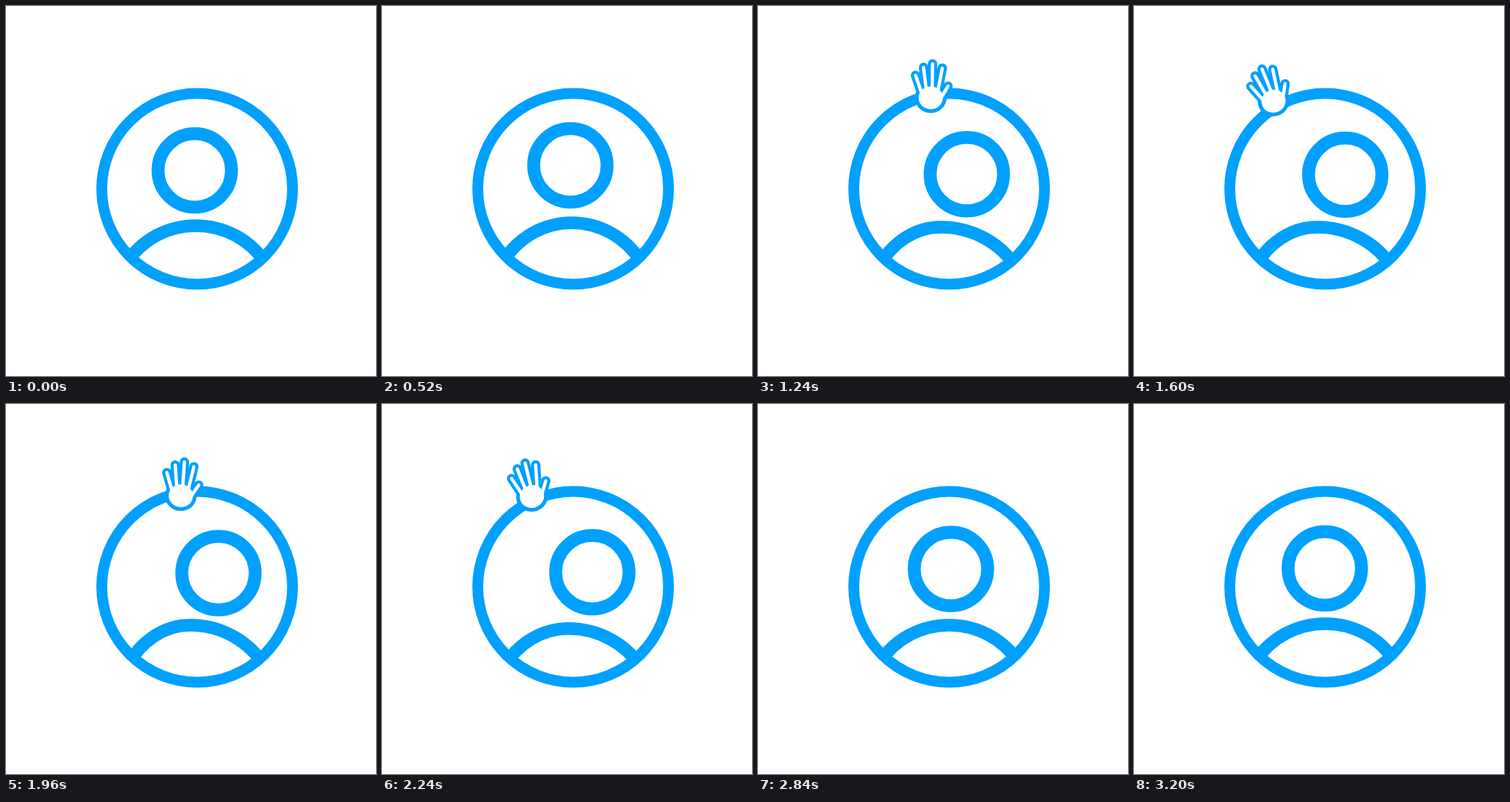
Recreate the animation shown at these times as an HTML page with a canvas. Size 512 by 512 pixels, loop 4080 ms.

```html
<!DOCTYPE html>
<html lang="en">
<head>
<meta charset="utf-8">
<title>Waving avatar</title>
<style>
  html, body { margin: 0; width: 100%; height: 100%; overflow: hidden; background: #fff; }
  canvas { display: block; width: 100vmin; height: 100vmin; }
</style>
</head>
<body>
<canvas id="stage" width="512" height="512"></canvas>
<script>
const ctx = document.getElementById('stage').getContext('2d');
const BLUE = '#00a0ff', WHITE = '#fff';
const LOOP = 4080, STEP = 40, REST = 3200;
const RING = { x: 264.5, y: 253, r: 132 };

// time, x, y
const head = [
  [0, 261.2, 227.5], [240, 250, 229], [520, 260.7, 220.5], [800, 283.5, 237],
  [1240, 289, 232.7], [1960, 294, 234], [2520, 284.5, 230.5],
  [2840, 267, 228.3], [3200, 264, 227.5]
];
// time, centre x, drop of the ends, apex x, apex y
const body = [
  [0, 263, 0, 262.5, 304], [240, 262, 3, 267, 305], [520, 263, -1, 262.5, 300],
  [800, 262.5, 7.5, 256, 310], [1240, 262, 7, 253, 306], [1960, 263, 8.5, 255, 306],
  [2520, 264, 11.5, 262, 315.5], [2840, 264.5, 2, 264.5, 306], [3200, 264.5, 0, 265, 304]
];
// time, palm x, palm y, degrees, scale
const hand = [
  [560, 150, 225, -75, 0], [640, 130, 180, -55, 1], [800, 185.5, 131, -26, 1],
  [1080, 243, 125, 2, 1], [1240, 239, 125, 0, 1], [1560, 190, 130, -24, 1],
  [1880, 245, 125.5, 4, 1], [1960, 242, 125, 3, 1], [2200, 205, 128, -16, 1],
  [2340, 215, 118, -9, 1], [2480, 190, 150, -25, 0]
];
// base x, base y, tip x, tip y, relative to the palm
const fingers = [
  [-13, -6, -21, -29], [-6, -8, -10, -40], [2, -8, 2.5, -45],
  [10, -8, 16, -39], [13, 4, 24, -14]
];

// Smooth interpolation that never overshoots its keys
function sample(keys, t) {
  const last = keys.length - 1;
  if (t <= keys[0][0]) return keys[0].slice(1);
  if (t >= keys[last][0]) return keys[last].slice(1);
  let i = 0;
  while (keys[i + 1][0] <= t) i++;
  const span = keys[i + 1][0] - keys[i][0], u = (t - keys[i][0]) / span;
  const rate = (n, c) => (keys[n + 1][c] - keys[n][c]) / (keys[n + 1][0] - keys[n][0]);
  const slope = (n, c) => {
    if (n === 0) return rate(0, c);
    if (n === last) return 0;
    const a = rate(n - 1, c), b = rate(n, c);
    return a * b > 0 ? 2 * a * b / (a + b) : 0;
  };
  return keys[i].slice(1).map((p, k) => {
    const c = k + 1, q = keys[i + 1][c];
    const m = slope(i, c) * span, n = slope(i + 1, c) * span;
    const u2 = u * u, u3 = u2 * u;
    return p * (2 * u3 - 3 * u2 + 1) + m * (u3 - 2 * u2 + u) +
           q * (3 * u2 - 2 * u3) + n * (u3 - u2);
  });
}

function circle(x, y, r, width) {
  ctx.beginPath();
  ctx.arc(x, y, r, 0, Math.PI * 2);
  ctx.lineWidth = width;
  ctx.stroke();
}

function drawBody([cx, drop, ax, ay]) {
  const x0 = cx - 96, x1 = cx + 96, y = 355.5 + drop;
  const l = (ax - x0) / 96, r = (x1 - ax) / 96, rise = (y - ay) * 0.631;
  ctx.save();
  ctx.beginPath();
  ctx.arc(RING.x, RING.y, RING.r, 0, Math.PI * 2);
  ctx.clip();
  ctx.beginPath();
  ctx.moveTo(x0, y);
  ctx.bezierCurveTo(x0 + 21.1 * l, y - rise, ax - 38.8 * l, ay, ax, ay);
  ctx.bezierCurveTo(ax + 38.8 * r, ay, x1 - 21.1 * r, y - rise, x1, y);
  ctx.lineWidth = 17.6;
  ctx.stroke();
  ctx.restore();
}

function handLayer(color, width, rx, ry) {
  ctx.strokeStyle = ctx.fillStyle = color;
  ctx.lineWidth = width;
  ctx.beginPath();
  for (const [bx, by, tx, ty] of fingers) {
    ctx.moveTo(bx, by);
    ctx.lineTo(tx, ty);
  }
  ctx.stroke();
  ctx.beginPath();
  ctx.ellipse(0, 2, rx, ry, 0, 0, Math.PI * 2);
  ctx.fill();
}

function drawHand([x, y, angle, scale]) {
  if (scale <= 0.01) return;
  ctx.save();
  ctx.translate(x, y);
  ctx.rotate(angle * Math.PI / 180);
  ctx.scale(scale, scale);
  ctx.lineCap = 'round';
  handLayer(BLUE, 13, 22, 21);
  handLayer(WHITE, 4.6, 16.8, 15.8);
  ctx.restore();
}

function draw(t) {
  ctx.fillStyle = WHITE;
  ctx.fillRect(0, 0, 512, 512);
  ctx.strokeStyle = BLUE;
  drawBody(sample(body, t));
  circle(...sample(head, t), 50.8, 17.8);
  circle(RING.x, RING.y, RING.r, 15);
  drawHand(sample(hand, t));
}

const start = performance.now();
function tick() {
  const t = (performance.now() - start) % LOOP;
  draw(Math.min(Math.floor(t / STEP) * STEP, REST));
  requestAnimationFrame(tick);
}
tick();
</script>
</body>
</html>
```
